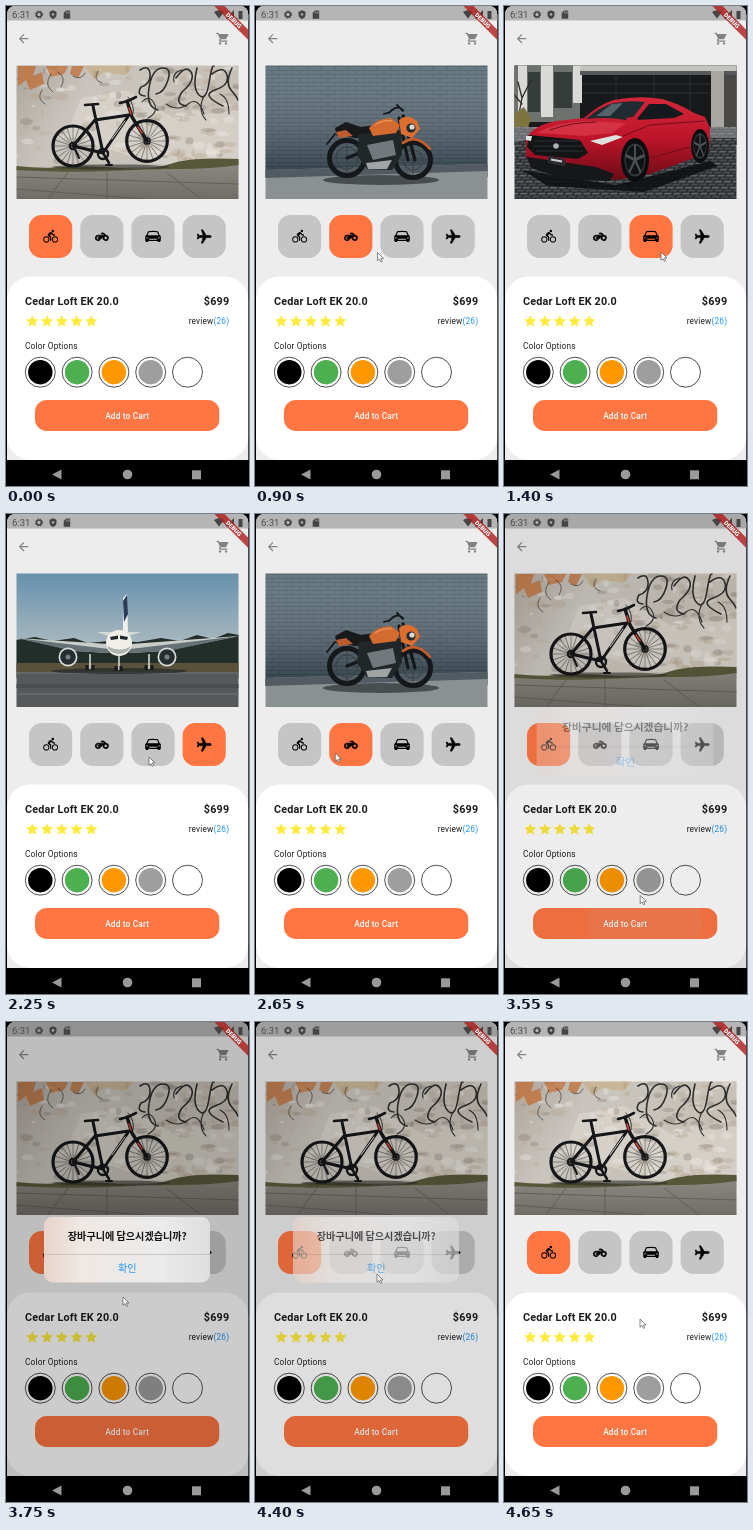
Animation, 243 px wide and 480 px high, one loop 4850 ms. Source, as an HTML page:

```html
<!DOCTYPE html>
<html lang="en">
<head>
<meta charset="utf-8">
<title>Product page</title>
<style>
html, body { margin: 0; width: 100%; height: 100%; overflow: hidden; background: #000; }
svg { display: block; width: 243px; height: 480px; }
text { font-family: Roboto, sans-serif; font-size: 8.3px; letter-spacing: .17px; fill: #1c1c1c; }
.strong { font-size: 10.8px; font-weight: 700; }
.mid { text-anchor: middle; }
#dialog text { font-family: "Noto Sans CJK KR", "Noto Sans CJK JP", sans-serif; font-size: 10.1px; letter-spacing: 0; }
.line { fill: none; stroke-linecap: round; stroke-linejoin: round; }
</style>
</head>
<body>
<svg viewBox="0 0 243 480">
  <defs>
    <clipPath id="frame"><rect x="10.5" y="59.5" width="222" height="133.5"/></clipPath>
    <clipPath id="screen"><path d="M1 455V9Q1 0 10 0H233.3Q242.3 0 242.3 9V455z"/></clipPath>
    <clipPath id="button"><rect x="29" y="394" width="184.5" height="31" rx="11.8"/></clipPath>
    <linearGradient id="sky" x2="0" y2="1"><stop stop-color="#6790ac"/><stop offset="1" stop-color="#b9c3c5"/></linearGradient>
    <linearGradient id="plaster" x2="1" y2=".3"><stop stop-color="#aca49b"/><stop offset=".35" stop-color="#c9c5be"/><stop offset="1" stop-color="#c6bfb5"/></linearGradient>
    <linearGradient id="pavement" x2="0" y2="1"><stop stop-color="#8e8a82"/><stop offset="1" stop-color="#6f6c67"/></linearGradient>
    <linearGradient id="paint" x2="0" y2="1"><stop stop-color="#d4273a"/><stop offset=".5" stop-color="#bd1429"/><stop offset="1" stop-color="#6d0b17"/></linearGradient>
    <linearGradient id="shade" x2="0" y2="1"><stop stop-color="#fff" stop-opacity=".12"/><stop offset="1" stop-color="#071019" stop-opacity=".45"/></linearGradient>
    <linearGradient id="sheet"><stop stop-color="#e8d3c9"/><stop offset=".22" stop-color="#efe8e4"/><stop offset=".7" stop-color="#ebebeb"/><stop offset="1" stop-color="#dedede"/></linearGradient>
    <pattern id="brick" width="14" height="8" patternUnits="userSpaceOnUse">
      <rect width="14" height="8" fill="#536671"/>
      <path d="M0 .5H14M0 4.5H14M3 .5v4M10 4.5v4" stroke="#3d4f5a" stroke-width=".8"/>
    </pattern>
    <pattern id="cobble" width="9" height="6" patternUnits="userSpaceOnUse" patternTransform="skewX(-24)">
      <rect width="9" height="6" fill="#26282b"/>
      <rect x=".6" y=".6" width="7.6" height="2" rx="1" fill="#606469"/>
      <rect x="-4" y="3.6" width="7.6" height="2" rx="1" fill="#494d52"/>
      <rect x="5" y="3.6" width="7.6" height="2" rx="1" fill="#494d52"/>
    </pattern>
  </defs>

  <rect width="243" height="480" fill="#000"/>
  <g clip-path="url(#screen)">
    <rect x="1" width="242" height="454" fill="#ededed"/>
    <rect x="1" width="242" height="14.5" fill="#b5b5b5"/>
    <g fill="#828282">
      <path transform="translate(10.5 25.6) scale(.59)" d="M20 11H7.83l5.59-5.59L12 4l-8 8 8 8 1.41-1.41L7.83 13H20z"/>
      <path transform="translate(210 25.6) scale(.59)" d="M7 18a2 2 0 1 0 0 4 2 2 0 0 0 0-4zM1 2v2h2l3.6 7.59-1.35 2.45C4.5 15.4 5.5 17 7 17h12v-2H7.42c-.2 0-.3-.2-.22-.37l.9-1.63h7.45c.75 0 1.41-.41 1.75-1.03l3.58-6.49A1 1 0 0 0 20 4H5.21l-.94-2zM17 18a2 2 0 1 0 0 4 2 2 0 0 0 0-4z"/>
    </g>

    <g clip-path="url(#frame)">
      <g class="photo" id="bike">
        <rect x="10" y="59" width="223" height="106" fill="url(#plaster)"/>
        <path d="M75 92L120 84 168 112 233 104V158H150L60 130z" fill="#dedad3" opacity=".6"/>
        <g id="wall"></g>
        <path d="M12 60H30L27 70 36 66 38 78 24 84 20 74 12 80zM40 60H62L58 68 45 71zM66 60H78L72 72 64 68z" fill="#c26a2e" opacity=".7"/>
        <path d="M78 59H128L120 69 98 66 88 74z" fill="#c9a877" opacity=".5"/>
        <g class="line" stroke="#2f2e2e">
          <g stroke-width="1.6">
            <path d="M134 64q9-6 10 4t-9 13q-5 8 4 9M152 104q-12-3-9-22t13-20 6 12-12 14M170 72q10-14 15-6t-9 20q-8 12 4 14M191 62q-5 20 2 27t10-12 5-17M206 68q12-9 15 1t-12 15 8 16M226 62q-7 15-1 22t7 10"/>
            <path d="M136 96q7-8 12 1t-6 15M160 98q12 8 22 0t16 10M198 90q-7 14 2 24M214 88q9 4 9 20M176 64q-10 2-8 12" stroke-width="1.1"/>
          </g>
          <path d="M45 68q-8 11 2 18m5-20q9 6 3 15m12-11q8 5 12-3m13-2q-6 9 4 12m-60 7q-6 9 3 14" stroke-width=".9" opacity=".7"/>
        </g>
        <path d="M10 163L160 161 233 155V194H10z" fill="url(#pavement)"/>
        <path d="M10 160q26 3 50 1t54 1 50-4 69-5v6q-28 4-60 4t-70 2-93-1z" fill="#57583a"/>
        <path d="M10 171L233 178M10 183L140 193M101 165L101 193M62 166L42 193M160 166L195 193" stroke="#5c5852" stroke-width=".8"/>
        <ellipse cx="105" cy="161" rx="59" ry="2.6" fill="#2e2d28" opacity=".6"/>
        <g class="line" stroke="#151618">
          <g id="spokes" stroke-width=".4"></g>
          <g stroke-width="3.2"><circle cx="67" cy="140" r="20"/><circle cx="141" cy="135" r="20.3"/></g>
          <path d="M87 100L97 147 123 109 89 114 67 140 97 147" stroke-width="3"/>
          <path d="M121 95L126 111 141 135" stroke-width="3.4"/>
          <path d="M79 99L92 98M114 97L122 95 130 91M97 147L103 157" stroke-width="2.6"/>
          <path d="M122 91q7 8 5 17" stroke-width=".8"/>
          <path d="M106 133L119 115" stroke="#dbd9d5" stroke-width="1"/>
          <path d="M123 102L125 108M132 121L136 127" stroke="#d84231" stroke-width="1.5"/>
          <circle cx="97" cy="148" r="5" stroke-width="2.4"/>
          <circle cx="67" cy="140" r="3.2" stroke-width="2"/><circle cx="141" cy="135" r="3" stroke-width="1.4"/>
          <path d="M100 159h6M69 143L73 152" stroke-width="2"/>
        </g>
      </g>

      <g class="photo" id="moto">
        <rect x="10" y="59" width="223" height="112" fill="url(#brick)"/>
        <rect x="10" y="59" width="223" height="112" fill="url(#shade)"/>
        <path d="M10 164L233 158V194H10z" fill="#8b9092"/>
        <path d="M10 164L233 158V165L10 172z" fill="#515b61"/>
        <ellipse cx="126" cy="174" rx="58" ry="5" fill="#373d40" opacity=".8"/>
        <g class="line" stroke="#15181a">
          <circle cx="92" cy="152" r="17.5" stroke-width="5"/><circle cx="158" cy="154" r="17.5" stroke-width="5"/>
          <g stroke="#3c4347" stroke-width="1.2"><circle cx="92" cy="152" r="11"/><circle cx="158" cy="154" r="10"/><path d="M92 137v30M78 152h28M158 139v30M145 154h27"/></g>
          <path d="M92 152L112 144M148 110L160 154M144 112L153 154" stroke-width="3.2"/>
          <path d="M134 107q8-9 14-3M148 105L142 99M135 106L129 108" stroke-width="1.8"/>
          <path d="M80 128L72 138" stroke-width="2"/>
        </g>
        <path d="M80 122L91 116 106 121 120 119 118 130 101 132 82 130z" fill="#17191b"/>
        <path d="M104 128L146 124 147 149 137 164 112 163 102 149z" fill="#212629"/>
        <path d="M112 139L138 134 141 149 118 154z" fill="#72797c"/><path d="M111 157L137 154 132 163 113 163z" fill="#a0a4a4"/>
        <path d="M114 122q8-10 22-10l9 7-4 8-23 3z" fill="#d36a30"/><path d="M120 119q9-6 17-4" class="line" stroke="#f3a269"/>
        <path d="M144 114q8-7 18 1l3 8-8 9-11-4z" fill="#dc6e2f"/><circle cx="156" cy="122" r="4.6" fill="#262a2b"/><circle cx="157" cy="121" r="2.6" fill="#d6dcda"/>
        <path d="M148 137q13-10 27 6" class="line" stroke="#c95e2b" stroke-width="2.5"/>
        <path d="M81 126L91 124 98 130 84 132z" fill="#bd5d2f"/>
      </g>

      <g class="photo" id="car">
        <rect x="10" y="59" width="223" height="80" fill="#17191a"/>
        <path d="M10 59H76V116H10z" fill="#6d726f"/>
        <path d="M14 59h9v50h-9zM37 59h12v52H37zM69 59h9v38h-9z" fill="#d9d9d5"/>
        <path d="M24 66h12v40H24zM50 66h18v36H50z" fill="#353c3a"/>
        <path d="M76 59H233V65H76z" fill="#c4c3bf"/><path d="M76 65H233V69H76z" fill="#55575a"/>
        <path d="M78 78H206M78 87H206M112 70v24M150 70v24M186 70v40" stroke="#2e3133"/>
        <path d="M207 65h13v58h-13z" fill="#a8a6a1"/><path d="M220 69H233V124H220z" fill="#4a4844"/>
        <path class="line" d="M13 118L18 92 14 76M18 92L27 74M18 98L8 86" stroke="#2f2a25" stroke-width="1.3"/>
        <path d="M10 108L20 101 27 112 24 122 10 123z" fill="#7d743f"/>
        <rect x="10" y="121" width="223" height="73" fill="url(#cobble)"/>
        <path d="M10 121H40L24 134 10 136zM204 121H233V132H206z" fill="#a5a7aa" opacity=".5"/>
        <path d="M18 164L112 179 206 155 214 160 140 186 44 180z" fill="#0c0e10" opacity=".85"/>
        <path d="M22 134Q27 120 52 115L80 112Q96 98 110 94Q134 89 158 93Q176 98 190 107L201 111 206 122 205 146 190 152 146 168 112 174 64 172 28 162 22 150z" fill="url(#paint)"/>
        <path d="M82 113Q97 100 110 97 126 94 141 96L126 115Q106 110 82 113z" fill="#1f2a31"/>
        <path d="M132 114L145 98 162 98 180 108 170 112z" fill="#15191d"/>
        <path d="M92 110L108 98 119 97 106 110z" fill="#7b8990" opacity=".6"/>
        <path d="M32 127Q54 116 84 115L122 117 108 127 80 130z" fill="#de3f50" opacity=".65"/>
        <path d="M46 124Q68 116 92 116M112 133L146 119 200 115M146 152L186 141" class="line" stroke="#6d0e1a"/>
        <path d="M25 129L76 134 84 147 74 153 31 149 23 141z" fill="#121416"/>
        <path d="M23 151L92 161 110 168 106 175 62 173 27 162z" fill="#15171a"/>
        <path d="M30 135H76M29 140H79M32 145H79" stroke="#33363a" stroke-width=".8"/>
        <circle cx="52" cy="140" r="2.8" fill="#aeb1b3"/>
        <path d="M86 135L112 129 119 131 98 139zM22 130L28 130 27 135 22 134z" fill="#dfe1df"/>
        <path d="M44 150L61 153V160L44 157z" fill="#2b2d30"/>
        <path d="M47 153.5L58 155.5" stroke="#c9cac9" stroke-width="2"/>
        <g id="wheels"></g>
        <path d="M122 112L133 110 134 116 124 118z" fill="#c81c30"/>
      </g>

      <g class="photo" id="plane">
        <rect x="10" y="59" width="223" height="90" fill="url(#sky)"/>
        <path d="M10 126L29 123 47 127 68 124 82 129 103 127 132 128 155 124 174 127 191 121 207 125 222 119 233 121V158H10z" fill="#232d2a"/>
        <path d="M10 149H233V164H10z" fill="#59513a"/><path d="M10 158H233V194H10z" fill="#55595b"/>
        <path d="M10 159H233M10 180H233" stroke="#77776e"/><path d="M10 170H233V174H10z" fill="#494e51"/>
        <ellipse cx="113" cy="157" rx="68" ry="3" fill="#22292b" opacity=".7"/>
        <path d="M117 119L117 84 121 80 122 119z" fill="#eef0ed"/><path d="M118 108L117 87 121 81 122 100z" fill="#293d5b"/>
        <path d="M11 124L102 130 103 139 70 137zM233 122L125 130 123 139 159 137z" fill="#c9cdca"/>
        <path d="M11 124L103 135 103 139 67 137zM233 122L124 135 123 139 162 137z" fill="#667176"/>
        <path d="M91 118L135 118 119 123 105 123z" fill="#d7dbd7"/>
        <circle cx="113" cy="129" r="13" fill="#f0efe8"/><path d="M101 132a13 13 0 0 0 24 0q-10 7-24 0" fill="#aeb4b1"/>
        <path d="M104 123L112 121.5V125L105 126zM114 121.5L122 123 121 126 114 125z" fill="#20282d"/>
        <g id="engines"></g>
        <path d="M113 142v14M84 140v15M143 140v15" stroke="#d3d7d4" stroke-width="1.6"/>
        <path d="M110 152v5M115 152v5M81 151v5M87 151v5M140 151v5M146 151v5" stroke="#17191a" stroke-width="3"/>
      </g>
    </g>

    <g id="tabs"></g>

    <rect x="1" y="270.5" width="241.3" height="183.5" rx="23.5" fill="#fff"/>
    <text class="strong" x="19" y="298.9">Cedar Loft EK 20.0</text>
    <text class="strong" x="223.3" y="298.9" text-anchor="end">$699</text>
    <g id="stars" fill="#ffeb3b"></g>
    <text x="223.2" y="318.3" text-anchor="end">review<tspan fill="#2196f3">(26)</tspan></text>
    <text x="19" y="343">Color Options</text>
    <g id="colors"></g>
    <g clip-path="url(#button)">
      <rect x="29" y="394" width="184.5" height="31" fill="#ff7643"/>
      <circle id="ripple" cx="141" cy="409" fill="#c8c8c8"/>
    </g>
    <text class="mid" x="121.2" y="412.5" style="fill:#fff;font-weight:500">Add to Cart</text>

    <rect id="dim" x="1" width="242" height="455" fill="#000"/>
    <g id="dialog">
      <rect x="38" y="195" width="166" height="65.5" rx="8.3" fill="url(#sheet)"/>
      <path d="M38 232.5H204" stroke="#b9b6b4" stroke-width=".7"/>
      <text class="mid" x="121.3" y="217.8" font-weight="700" style="fill:#111">장바구니에 담으시겠습니까?</text>
      <text class="mid" x="121.3" y="250.2" font-weight="500" style="fill:#2196f3">확인</text>
    </g>

    <text x="6" y="11.8" style="font-size:9.5px;fill:#4c4c4c;letter-spacing:0">6:31</text>
    <g fill="#454545">
      <circle cx="33" cy="8.5" r="2.5" fill="none" stroke="#454545" stroke-width="1.7"/>
      <circle cx="33" cy="8.5" r="3.6" fill="none" stroke="#454545" stroke-dasharray="1.4 1.5"/>
      <path d="M47 4.3l3.5 1.4v2.8q0 3.1-3.5 4.6-3.5-1.5-3.5-4.6V5.7z"/><circle cx="47" cy="8.4" r="1.2" fill="#b5b5b5"/>
      <path d="M60 4.5h4.2v8.2h-6.5V7z"/><path d="M60.5 5.5v2m1.5-2v2m1.3-2v2" stroke="#b5b5b5" stroke-width=".6"/>
      <path d="M208 6q5-3.5 10 0l-5 6.5zM228 4v8.5h-8.5zM232.5 5h4v8h-4z"/>
    </g>
    <g transform="translate(242.3 0) rotate(45)">
      <rect x="-24" y="16.8" width="48" height="7.2" fill="#b01c1c" fill-opacity=".8"/>
      <text class="mid" y="22.6" style="fill:#fff;font-size:6px;font-weight:900;letter-spacing:0">DEBUG</text>
    </g>
  </g>
  <g fill="#999">
    <path d="M46 468.5L55.5 463.5V473.5z"/><circle cx="121.5" cy="468.5" r="4.8"/><rect x="186" y="464.3" width="9" height="9"/>
  </g>
  <path id="cursor" d="M0 0V8.2L2 6.6 3.4 9.4 4.7 8.7 3.4 6H6z" fill="#fff" stroke="#555" stroke-width=".7"/>
</svg>

<script>
const LOOP = 4850, STEP = 50;
const $ = id => document.getElementById(id);
const fill = (id, list, draw) => { $(id).innerHTML = list.map(draw).join(''); };
const range = n => Array.from({ length: n }, (_, i) => i);

let seed = 7;
const random = (a, b) => {
  seed = (seed * 16807) % 2147483647;
  return (a + (b - a) * seed / 2147483647).toFixed(1);
};

const icons = [
  '<path transform="translate(-7.4 -7.6) scale(.62)" fill-rule="evenodd" d="M15.5 5.5a2 2 0 1 0 0-4 2 2 0 0 0 0 4zM5 12a5 5 0 1 0 0 10 5 5 0 0 0 0-10zm0 8.5a3.5 3.5 0 1 1 0-7 3.5 3.5 0 0 1 0 7zm5.8-10l2.4-2.4.8.8c1.3 1.3 3 2.1 5.1 2.1V9c-1.5 0-2.7-.6-3.6-1.5l-1.9-1.9a2.1 2.1 0 0 0-3 0L7.8 8.4a2 2 0 0 0 0 2.8L11 14v5h2v-6.2zM19 12a5 5 0 1 0 0 10 5 5 0 0 0 0-10zm0 8.5a3.5 3.5 0 1 1 0-7 3.5 3.5 0 0 1 0 7z"/>',
  '<path transform="translate(-6.5 -6.3) scale(.55)" fill-rule="evenodd" stroke="#000" stroke-width="1.2" d="M19.44 9.03L15.41 5H11v2h3.59l2 2H5a5 5 0 1 0 4.9 6h1.65l2.77-2.77A5 5 0 1 0 19.44 9.03zM7.82 15A3 3 0 1 1 7.82 13H5v2zM19 17a3 3 0 1 1 0-6 3 3 0 0 1 0 6z"/>',
  '<path fill-rule="evenodd" d="M-5-5.3Q0-6.2 5-5.3L6.6-1.6 7.8-.4V4.2L6.8 5.6H4.8V4.4H-4.8V5.6H-6.8L-7.8 4.2V-.4L-6.6-1.6zM-4.2-4.2L-5.4-1.3H5.4L4.2-4.2Q0-4.9-4.2-4.2zM-6.6.4V1.7L-4 1.9zM6.6.4V1.7L4 1.9zM-3.8 2.3H3.8V3.3H-3.8z"/>',
  '<path transform="rotate(90) scale(.7) translate(-11.5 -12)" stroke="#000" stroke-width=".9" d="M21 16v-2l-8-5V3.5a1.5 1.5 0 0 0-3 0V9l-8 5v2l8-2.5V19l-2 1.5V22l3.5-1 3.5 1v-1.5L13 19v-5.5z"/>'
];
fill('tabs', icons, (icon, i) => `<g transform="translate(${44.6 + i * 51.2} 230.5)">
  <rect class="tab" x="-21.6" y="-21.5" width="43.2" height="43" rx="12.5"/>${icon}</g>`);
fill('stars', range(5), i => `<path transform="translate(${18.9 + i * 14.75} 307.8) scale(.615)"
  d="M12 17.27L18.18 21l-1.64-7.03L22 9.24l-7.19-.61L12 2 9.19 8.63 2 9.24l5.46 4.73L5.82 21z"/>`);
fill('colors', ['#000', '#4caf50', '#ff9800', '#9e9e9e', '#fff'], (color, i) => `<g transform="translate(${34.3 + i * 36.8} 366.2)">
  <circle r="15" fill="#fff" stroke="#222" stroke-width=".8"/><circle r="12.2" fill="${color}"/></g>`);

// Photo details
fill('wall', range(150), i => `<ellipse cx="${random(10, 233)}" cy="${random(60, 158)}" rx="${random(1, 8)}" ry="${random(1, 4)}"
  fill="${['#efece7', '#857c74', '#b7a48d'][i % 3]}" opacity=".35"/>`);
fill('spokes', [[67, 140], [141, 135]], ([x, y]) => range(10).map(i =>
  `<path transform="translate(${x} ${y}) rotate(${i * 18})" d="M-20 0H20"/>`).join(''));
fill('wheels', [[131, 154, 14, 22], [196, 140, 9, 17]], ([x, y, rx, ry]) => `<g transform="translate(${x} ${y}) scale(${rx} ${ry})">
  <circle r="1" fill="#0b0d0e"/><circle r=".75" fill="#34373a"/><circle r=".66" fill="#101315"/>
  ${range(5).map(i => `<path d="M0 0V-.7" transform="rotate(${i * 72})" stroke="#4b5054" stroke-width=".14"/>`).join('')}</g>`);
fill('engines', [62, 161], x => `<circle cx="${x}" cy="143" r="9.5" fill="#d9dcd8"/><circle cx="${x}" cy="143" r="7.8" fill="#262e32"/>
  <circle cx="${x}" cy="143" r="2.5" fill="#78807f"/>`);

const photos = ['bike', 'moto', 'car', 'plane'].map($);
const tabs = [...document.querySelectorAll('.tab')];

const picks = [[0, 0], [800, 1], [1400, 2], [1850, 3], [2650, 1], [2850, 0]];
const pointer = [
  [50, 198, 414], [200, 150, 330], [350, 105, 265], [550, 91, 249], [650, 91, 248], [800, 91, 248],
  [1000, 154, 245], [1200, 154, 245], [1400, 157, 246], [1500, 160, 246], [1650, 193, 245], [1850, 195, 246],
  [2000, 190, 258], [2100, 181, 255], [2250, 143, 243], [2350, 111, 241], [2500, 81, 239], [2700, 80, 239],
  [2850, 46, 238], [2900, 46, 239], [3150, 141, 408], [3500, 141, 408], [3750, 117, 275], [3850, 120, 247],
  [4300, 121, 247], [4400, 122, 252], [4650, 136, 297]
];
const PRESS = 3250, OPEN = 3450, CLOSE = 4300, FADE = 250;

const clamp = v => Math.min(1, Math.max(0, v));
const smooth = v => v * v * (3 - 2 * v);

function pointAt(t) {
  const next = pointer.findIndex(p => p[0] > t);
  if (next < 0) return pointer[pointer.length - 1].slice(1);
  const [t0, x0, y0] = pointer[next - 1], [t1, x1, y1] = pointer[next];
  const k = (t - t0) / (t1 - t0);
  return [x0 + (x1 - x0) * k, y0 + (y1 - y0) * k];
}

function render(now) {
  const t = Math.floor((now % LOOP) / STEP) * STEP;

  const selected = picks.filter(p => p[0] <= t).pop()[1];
  photos.forEach((photo, i) => { photo.style.display = i === selected ? '' : 'none'; });
  tabs.forEach((tab, i) => tab.setAttribute('fill', i === selected ? '#ff7643' : '#c5c5c5'));

  $('ripple').setAttribute('r', Math.max(0, (t - PRESS) * 0.19));
  $('ripple').setAttribute('opacity', 0.15 * (1 - clamp((t - OPEN) / FADE)));

  const entry = clamp((t - OPEN) / FADE);
  const shown = smooth(entry) * (1 - smooth(clamp((t - CLOSE) / FADE)));
  const scale = 1 + 0.3 * (1 - entry) ** 3;
  $('dim').setAttribute('opacity', 0.2 * shown);
  $('dialog').setAttribute('opacity', shown);
  $('dialog').setAttribute('transform', `translate(121 227.7) scale(${scale}) translate(-121 -227.7)`);

  const visible = t >= pointer[0][0];
  $('cursor').style.display = visible ? '' : 'none';
  if (visible) $('cursor').setAttribute('transform', `translate(${pointAt(t)})`);
}

function tick() {
  render(performance.now());
  requestAnimationFrame(tick);
}
tick();
</script>
</body>
</html>
```
